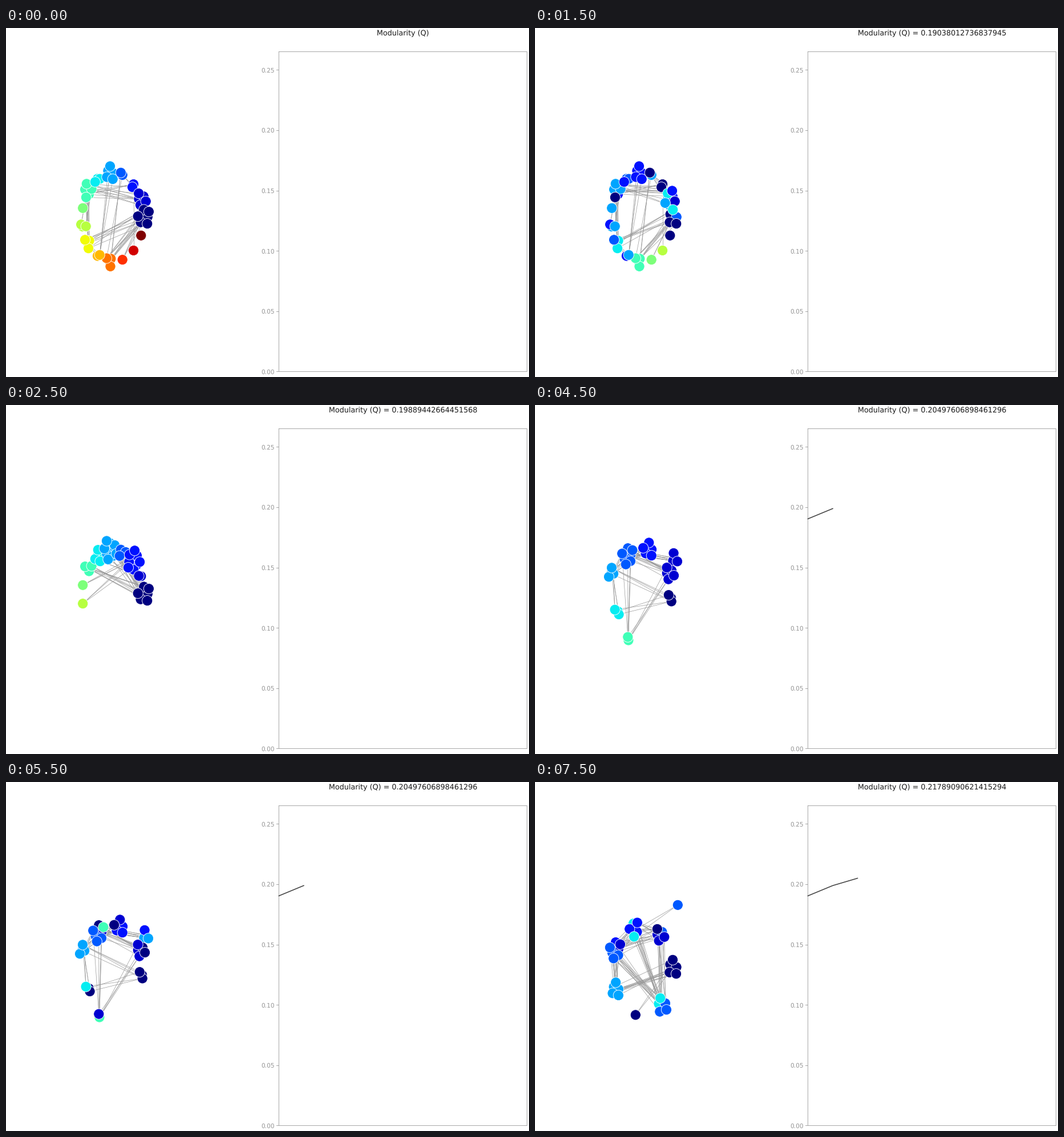
Write a matplotlib script that moves like this. It is 917 px wide and 611 px high and loops after 8 s.

```python
import math
import random

import matplotlib.pyplot as plt
from matplotlib import colormaps
from matplotlib.animation import FuncAnimation
from matplotlib.collections import LineCollection

W, H, DPI = 917, 611, 100
PT = 72 / DPI  # points per pixel
STEP_MS, FRAMES = 500, 16
SECTOR = 24    # degrees per community on the full ring
SCORES = [0.19038012736837945, 0.19889442664451568,
          0.20497606898461296, 0.21789090621415294]
PALETTE = [colormaps["jet"](i / 14) for i in range(15)]


def ring(counts, colours=None):
    """Communities at even steps around the ellipse."""
    colours = colours or [[k] for k in range(len(counts))]
    return [(SECTOR * k, n, c, 1) for k, (n, c) in enumerate(zip(counts, colours))]


def place(angle, scale=1):
    t = math.radians(angle)
    return 187.5 + 54 * scale * math.cos(t), 331.5 - 78 * scale * math.sin(t)


def community(index, angle, count, colours, scale):
    """Nodes (x, y, colour) on a small spiral around one place of the ellipse."""
    cx, cy = place(angle, scale)
    phase = random.Random(index).uniform(0, math.tau)
    nodes = []
    for j in range(count):
        turn, r = phase + 2.4 * j, math.sqrt(j)
        nodes.append((cx + 3.9 * r * math.cos(turn), cy + 6 * r * math.sin(turn),
                      colours[j % len(colours)]))
    return nodes


def link(groups, i, j):
    """Random links between two communities, more for larger ones."""
    rng = random.Random(100 * i + j)
    count = min(12, len(groups[i]) * len(groups[j]) // 4 + 1)
    return [(rng.choice(groups[i])[:2], rng.choice(groups[j])[:2])
            for _ in range(count)]


def scene(layout, pairs):
    groups = [community(i, *spec) for i, spec in enumerate(layout)]
    nodes = [node for group in reversed(groups) for node in group]
    segments = [s for i, j in pairs for s in link(groups, i, j)]
    return nodes, segments


def before_merge(layout, step):
    """The same layout coloured by angle, with strays still near the ring."""
    return [(angle, n, [round(angle / step)], min(scale, 1.35))
            for angle, n, _, scale in layout]


# Layouts: angle, node count, colours in turn, distance from the centre.
OUTER = [2, 2, 6, 3, 6, 1, 3, 4, 2, 4, 1, 1, 1]
MERGED = [[0, 0, 0, 3, 0, 5], [1, 4, 2, 4, 5], [0], [4, 0], [2], [3, 3, 2],
          [4, 2, 4, 4, 0], [4], [4, 2], [5, 5, 5, 3], [2, 4], [6], [7], [8], [0]]
ARC = ring([9, 2, 11, 4, 11, 5, 4, 1, 1])
ARC_MERGED = [
    (0, 7, [0], 1), (24, 3, [1], 1), (47, 10, [2], 1), (72, 3, [1, 2, 0], 1),
    (92, 8, [3], 1), (109, 4, [0, 1, 3, 2], 0.95), (130, 3, [4], 1),
    (148, 3, [5], 0.93), (168, 1, [6], 1), (192, 1, [1], 1), (-2, 1, [3], 2.42),
]
FAN = [
    (-5, 3, [0], 0.95), (28, 6, [1, 1, 0], 1), (38, 4, [3, 4, 2, 4], 1.33),
    (78, 7, [2, 0, 2, 2, 1], 1.03), (118, 9, [3, 3, 1, 3, 0, 3, 3, 6], 1),
    (155, 4, [4], 1.1), (206, 3, [0, 0, 5], 0.87), (247, 2, [6, 1], 1.12),
]
LOOP = [
    (5, 7, [0], 1), (55, 6, [1, 1, 3, 1, 0], 1), (105, 7, [2, 2, 5, 2], 1),
    (150, 9, [3, 3, 1, 3, 2], 1), (205, 6, [4], 0.95), (258, 1, [0], 1),
    (310, 7, [3, 3, 5], 1), (52, 1, [3], 1.89),
]

# Linked communities of each layout
RING_PAIRS = [(1, 6), (2, 6), (6, 9), (6, 8), (9, 0), (11, 0), (4, 6), (4, 10),
              (3, 1), (3, 11), (9, 10), (13, 2), (12, 0)]
ARC_PAIRS = [(4, 0), (6, 0), (7, 2), (8, 2), (4, 2), (3, 0), (5, 4), (5, 1)]
ARC_MERGED_PAIRS = [(4, 0), (7, 0), (8, 1), (9, 1), (4, 2), (5, 2), (6, 4),
                    (3, 0), (10, 4)]
FAN_PAIRS = [(4, 1), (4, 2), (4, 3), (5, 4), (5, 6), (5, 0), (6, 0), (7, 4), (7, 1)]
LOOP_PAIRS = [(3, 6), (3, 2), (3, 1), (4, 0), (2, 6), (1, 6), (3, 4), (5, 0),
              (1, 2), (7, 2)]

SCENES = [
    scene(ring([9, 6] + OUTER), RING_PAIRS),
    scene(ring([7, 8] + OUTER), RING_PAIRS),
    scene(ring([7, 8] + OUTER, MERGED), RING_PAIRS),
    scene(ARC, ARC_PAIRS),
    scene(ARC_MERGED, ARC_MERGED_PAIRS),
    scene(before_merge(FAN, 41), FAN_PAIRS),
    scene(FAN, FAN_PAIRS),
    scene(before_merge(LOOP, 57), LOOP_PAIRS),
    scene(LOOP, LOOP_PAIRS),
]

plt.rcParams.update({"font.family": "DejaVu Sans", "text.hinting": "none"})
fig = plt.figure(figsize=(W / DPI, H / DPI), dpi=DPI, facecolor="white")
ax = fig.add_axes([0, 0, 1, 1])
ax.set(xlim=(0, W), ylim=(H, 0))
ax.axis("off")

# Chart frame, in pixels
LEFT, RIGHT, TOP, BOTTOM = 478, 913, 41, 601
GREY = "#999999"


def score_y(q):
    return BOTTOM + 0.4 - q * 2112


ax.plot([LEFT, RIGHT, RIGHT, LEFT, LEFT], [TOP, TOP, BOTTOM, BOTTOM, TOP],
        color=GREY, lw=0.85 * PT)
for k in range(6):
    y = score_y(k * 0.05)
    ax.plot([LEFT - 4, LEFT], [y, y], color=GREY, lw=0.85 * PT)
    ax.text(LEFT - 7, y + 4.2, f"{k * 0.05:.2f}", ha="right", va="baseline",
            color=GREY, fontsize=10.6 * PT)

title = ax.text(696, 13, "", ha="center", va="baseline", color="#1a1a1a",
                fontsize=12.75 * PT)
curve, = ax.plot([], [], color="#444444", lw=1.6 * PT)
edges = LineCollection([], colors="#999999", linewidths=0.7 * PT, zorder=2)
ax.add_collection(edges)
dots = ax.scatter([], [], s=(18.2 * PT) ** 2, edgecolors="white",
                  linewidths=0.9 * PT, zorder=3)


def draw(frame):
    index = (frame + 1) // 2
    nodes, segments = SCENES[index]
    edges.set_segments(segments)
    dots.set_offsets([n[:2] for n in nodes])
    dots.set_facecolors([PALETTE[n[2]] for n in nodes])

    level = (index + 1) // 2
    title.set_text("Modularity (Q)" + (f" = {SCORES[level - 1]}" if level else ""))
    past = SCORES[:max(level - 1, 0)]
    curve.set_data([LEFT + 0.5 + 43.5 * k for k in range(len(past))],
                   [score_y(q) for q in past])
    return edges, dots, title, curve


anim = FuncAnimation(fig, draw, frames=FRAMES, interval=STEP_MS,
                     repeat=True, repeat_delay=0, blit=False)
plt.show()
```
